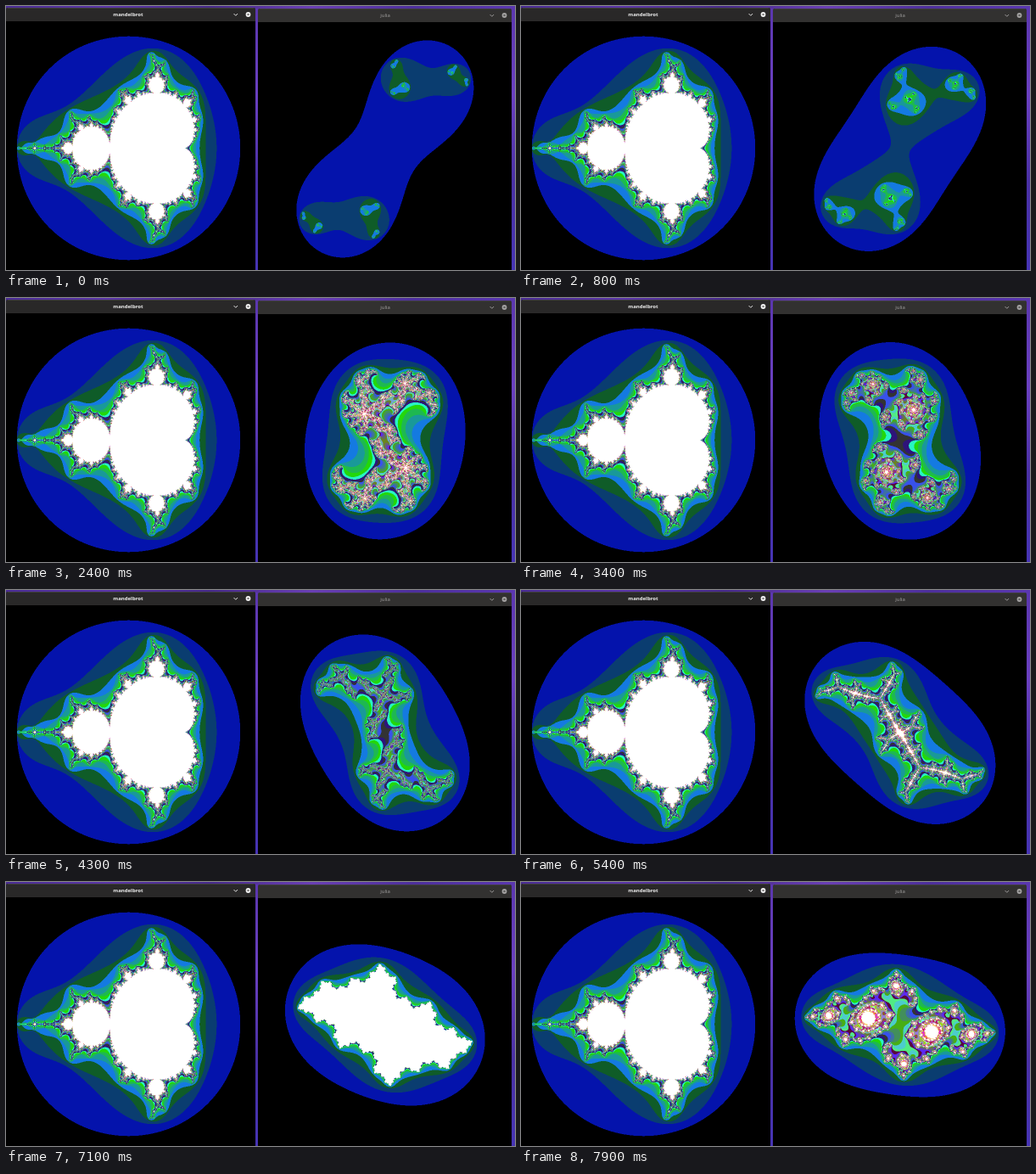
Recreate the animation shown at these times as an HTML page with a canvas. Size 600 px wide and 311 px high, loop 8 s.

```html
<!DOCTYPE html>
<html lang="en">
<head>
<meta charset="utf-8">
<title>Mandelbrot and Julia</title>
<style>
  html, body { margin: 0; width: 100%; height: 100%; overflow: hidden; background: #000; }
  canvas { display: block; }
</style>
</head>
<body>
<canvas id="stage" width="600" height="311"></canvas>
<script>
const ctx = document.getElementById('stage').getContext('2d');
const LOOP = 8000, STEP = 100, MAX = 50, SS = 2;

const pack = (r, g, b) => (255 << 24 | b << 16 | g << 8 | r) >>> 0;

// Colour is the iteration count scaled to 24 bits, so the channels wrap around.
const palette = new Uint32Array(MAX + 1);
for (let n = 0; n <= MAX; n++) {
  const v = Math.floor(n * 0xffffff / MAX);
  palette[n] = pack(v >> 16, v >> 8 & 255, v & 255);
}
palette[1] = pack(4, 19, 172); // the outer band is a deeper blue

// Path of the Julia constant: time, real, imaginary
const path = [
  [0, 0.62, -1.56],
  [1500, 0.325, -0.56],
  [2400, 0.4, -0.146],
  [4300, 0.335, 0.628],
  [5400, -0.112, 0.892],
  [6300, -0.2, 0.648],
  [7900, -0.748, 0.222]
];

function slope(i, k) {
  const a = path[Math.max(i - 1, 0)], b = path[Math.min(i + 1, path.length - 1)];
  return (b[k] - a[k]) / (b[0] - a[0]);
}

function constantAt(t) {
  let i = 0;
  while (i < path.length - 2 && t > path[i + 1][0]) i++;
  const a = path[i], b = path[i + 1], h = b[0] - a[0];
  const u = (t - a[0]) / h, v = 1 - u;
  return [1, 2].map(k =>
    v * v * (1 + 2 * u) * a[k] + u * u * (3 - 2 * u) * b[k] +
    h * u * v * (v * slope(i, k) - u * slope(i + 1, k)));
}

function makeView(x, y, w, h, centre, scale, origin) {
  const canvas = document.createElement('canvas');
  canvas.width = w * SS;
  canvas.height = h * SS;
  const g = canvas.getContext('2d');
  const image = g.createImageData(w * SS, h * SS);
  return { x, y, w, h, centre, scale, origin, canvas, g, image,
           pixels: new Uint32Array(image.data.buffer) };
}

function escapeCount(x, y, a, b) {
  let n = 0, xx = x * x, yy = y * y;
  while (n < MAX) {
    y = 2 * x * y + b;
    x = xx - yy + a;
    xx = x * x;
    yy = y * y;
    if (xx + yy > 4) break;
    n++;
  }
  return n;
}

// Without a constant, every point is its own constant.
function render(view, c) {
  const W = view.w * SS, H = view.h * SS;
  for (let j = 0, p = 0; j < H; j++) {
    const im = (view.centre[1] - view.y - (j + 0.5) / SS) / view.scale[1];
    for (let i = 0; i < W; i++, p++) {
      const re = (view.x + (i + 0.5) / SS - view.centre[0]) / view.scale[0] + view.origin;
      view.pixels[p] = palette[c ? escapeCount(re, im, c[0], c[1]) : escapeCount(re, im, re, im)];
    }
  }
  view.g.putImageData(view.image, 0, 0);
  ctx.drawImage(view.canvas, view.x, view.y, view.w, view.h);
}

function box(x, y, w, h, fill) {
  ctx.fillStyle = fill;
  ctx.fillRect(x, y, w, h);
}

function titleBar(x, y, w, h, label, mid, weight, ink, fill) {
  ctx.fillStyle = fill;
  ctx.beginPath();
  ctx.roundRect(x, y, w, h, [2, 2, 0, 0]);
  ctx.fill();
  box(x + 2, y, w - 4, 1, '#403f3e');
  const cy = y + h / 2;
  ctx.fillStyle = ink;
  ctx.font = weight + ' 6px "Open Sans", "Noto Sans", sans-serif';
  ctx.textAlign = 'center';
  ctx.textBaseline = 'alphabetic';
  ctx.fillText(label, mid, cy + 2.2);
  const right = x + w;
  ctx.strokeStyle = ink;
  ctx.lineWidth = 0.9;
  ctx.beginPath();
  ctx.moveTo(right - 25.5, cy - 1);
  ctx.lineTo(right - 23.2, cy + 1.3);
  ctx.lineTo(right - 20.9, cy - 1);
  ctx.stroke();
  ctx.fillStyle = ink;
  ctx.beginPath();
  ctx.arc(right - 8.5, cy, 2.9, 0, Math.PI * 2);
  ctx.fill();
  ctx.strokeStyle = fill;
  ctx.lineWidth = 0.7;
  ctx.beginPath();
  for (const s of [-1, 1]) {
    ctx.moveTo(right - 9.5, cy - s);
    ctx.lineTo(right - 7.5, cy + s);
  }
  ctx.stroke();
}

function drawDesktop() {
  const sky = ctx.createLinearGradient(0, 0, 600, 0);
  ['#4a2c94', '#5b35a8', '#46298a', '#6a3fb4', '#4d2f9c', '#5a37b0']
    .forEach((c, i) => sky.addColorStop(i / 5, c));
  box(0, 0, 600, 311, sky);
  const side = ctx.createLinearGradient(0, 0, 0, 311);
  ['#5a36ae', '#6a40c0', '#4930a4', '#4634b4']
    .forEach((c, i) => side.addColorStop(i / 3, c));
  box(294, 3, 3, 308, side);
  box(596, 3, 4, 308, side);
}

const mandel = makeView(0, 18, 294, 293, [144.5, 167.5], [87.8, 99.6], -0.5);
const julia = makeView(297, 19, 299, 292, [446.8, 168.4], [74.75, 74.75], 0);

drawDesktop();
titleBar(0, 2, 294, 16, 'mandelbrot', 144, 'bold', '#f0f0f0', '#292828');
titleBar(297, 3, 299, 16, 'julia', 447, '500', '#a4a2a2', '#323130');
render(mandel);

let shown = -1;
function frame(now) {
  const step = Math.floor((now % LOOP) / STEP);
  if (step !== shown) {
    shown = step;
    render(julia, constantAt(step * STEP));
  }
  requestAnimationFrame(frame);
}
frame(0);
</script>
</body>
</html>
```
